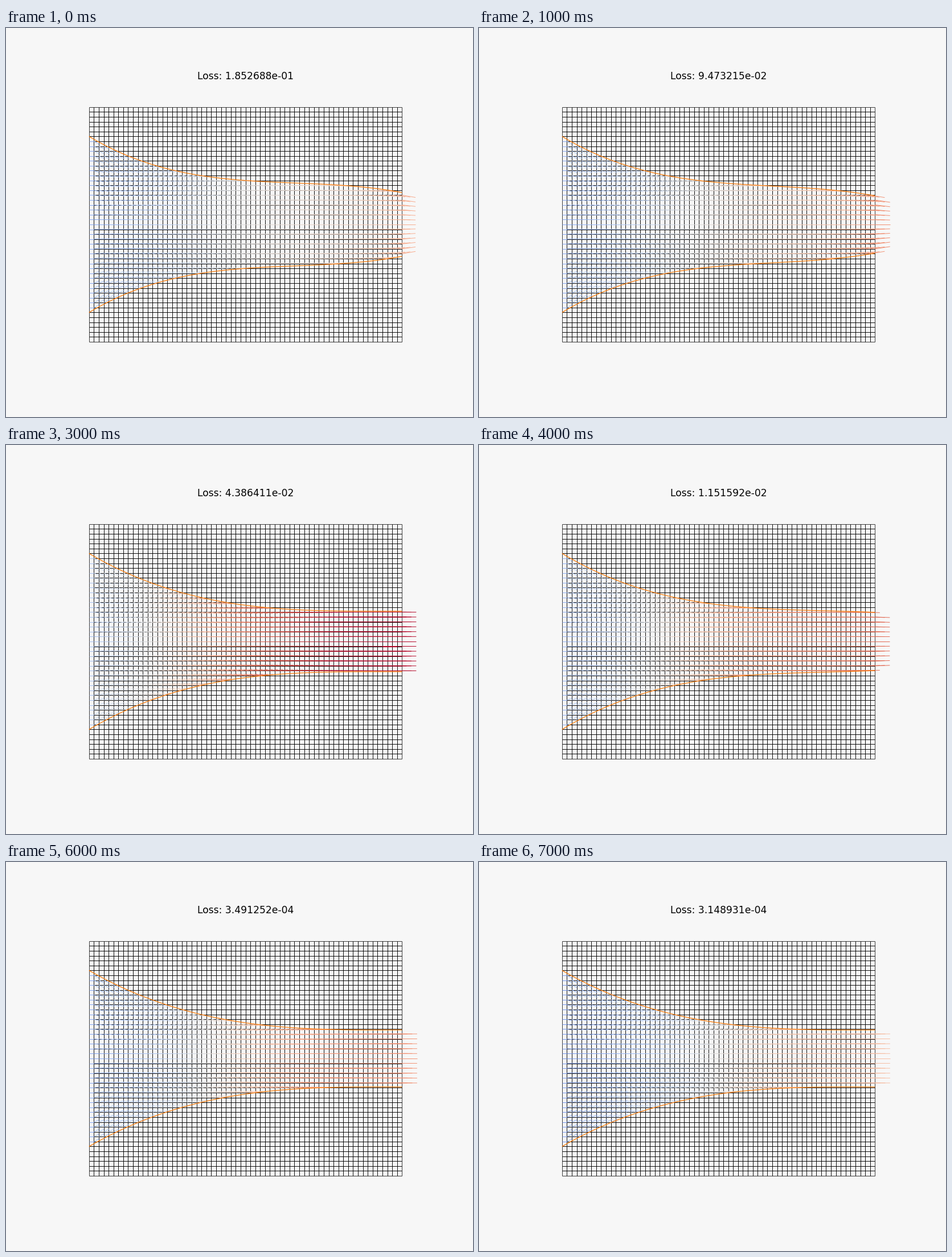
Recreate the animation shown at these times as a matplotlib script. Size 820 px wide and 683 px high, loop 8000 ms.

```python
import numpy as np
import matplotlib.pyplot as plt
from matplotlib.animation import FuncAnimation
from matplotlib.collections import LineCollection

W, H, DPI = 820, 683, 80
NX, NY, PAD = 64, 48, 5      # cells and margin around them
MID, INLET = NY / 2, 18.0    # channel axis and inlet half-width
PX = 72 / DPI                # one pixel in points

# loss, half-width control values (in cells), colour value of the inlet speed
STEPS = [
    ("1.852688e-01", (5.24, 10.55, 6.52), 0.254),
    ("9.473215e-02", (5.18, 9.70, 5.86), 0.254),
    ("5.828742e-02", (5.14, 8.98, 5.82), 0.207),
    ("4.386411e-02", (5.44, 6.23, 6.18), 0.345),
    ("1.151592e-02", (5.16, 6.90, 5.95), 0.284),
    ("2.207845e-03", (5.45, 6.20, 5.80), 0.265),
    ("3.491252e-04", (5.75, 5.73, 5.83), 0.249),
    ("3.148931e-04", (5.75, 5.73, 5.83), 0.210),
]

cols = np.arange(NX + 1)
offsets = np.arange(NY + 1) - MID


def wall(ctrl):
    """Half-width and its slope along the channel (cubic Bezier)."""
    a, (b, c, d) = INLET, ctrl
    t = cols / NX
    s = 1 - t
    half = a * s**3 + 3 * b * s * s * t + 3 * c * s * t * t + d * t**3
    slope = 3 * ((b - a) * s * s + 2 * (c - b) * s * t + (d - c) * t * t) / NX
    return half, slope


def grid_lines():
    lines = []
    for i in range(NX):
        for j in range(NY):
            p = [(i, j), (i + 1, j), (i + 1, j + 1), (i, j + 1)]
            lines += [(p[k], p[(k + 1) % 4]) for k in range(4)]
    return lines


def flow_lines(half, slope):
    """Free-slip flow: flat profile, direction follows the walls."""
    lines, speeds = [], []
    for i in cols:
        u = INLET / half[i]
        for y in offsets[np.abs(offsets) < half[i] - 1e-6]:
            v = u * slope[i] * y / half[i] if i else 0.0
            lines.append([(i, MID + y), (i + u, MID + y + v)])
            speeds.append(np.hypot(u, v))
    return lines, np.array(speeds)


def wall_lines(half):
    lines = []
    for sign in (1, -1):
        pts = np.column_stack([cols, MID + sign * half])
        lines += list(zip(pts[:-1], pts[1:]))
    return lines


fig = plt.figure(figsize=(W / DPI, H / DPI), dpi=DPI, facecolor="#f7f7f7")
unit = 0.775 * W / (NX + 2 * PAD)
ax_h = unit * (NY + 2 * PAD)
ax = fig.add_axes([0.125 + 0.3 / W, 0.495 - ax_h / H / 2, 0.775, ax_h / H])
ax.set_xlim(-PAD, NX + PAD)
ax.set_ylim(-PAD, NY + PAD)
ax.axis("off")
title = ax.set_title("", fontsize=17.07 * PX, pad=5.7 * PX)

ax.add_collection(LineCollection(grid_lines(), colors="k", linewidths=0.75 * PX))
flow = ax.add_collection(LineCollection([], linewidths=0.95 * PX))
walls = ax.add_collection(LineCollection([], colors="tab:orange", linewidths=1.3 * PX))


def update(n):
    loss, ctrl, tone = STEPS[n]
    half, slope = wall(ctrl)
    lines, speeds = flow_lines(half, slope)
    flow.set_segments(lines)
    flow.set_color(plt.cm.coolwarm(np.clip(speeds * tone, 0, 1)))
    walls.set_segments(wall_lines(half))
    title.set_text("Loss: " + loss)
    return flow, walls, title


anim = FuncAnimation(fig, update, frames=len(STEPS), interval=1000,
                     repeat=True, repeat_delay=0, blit=False)
plt.show()
```
